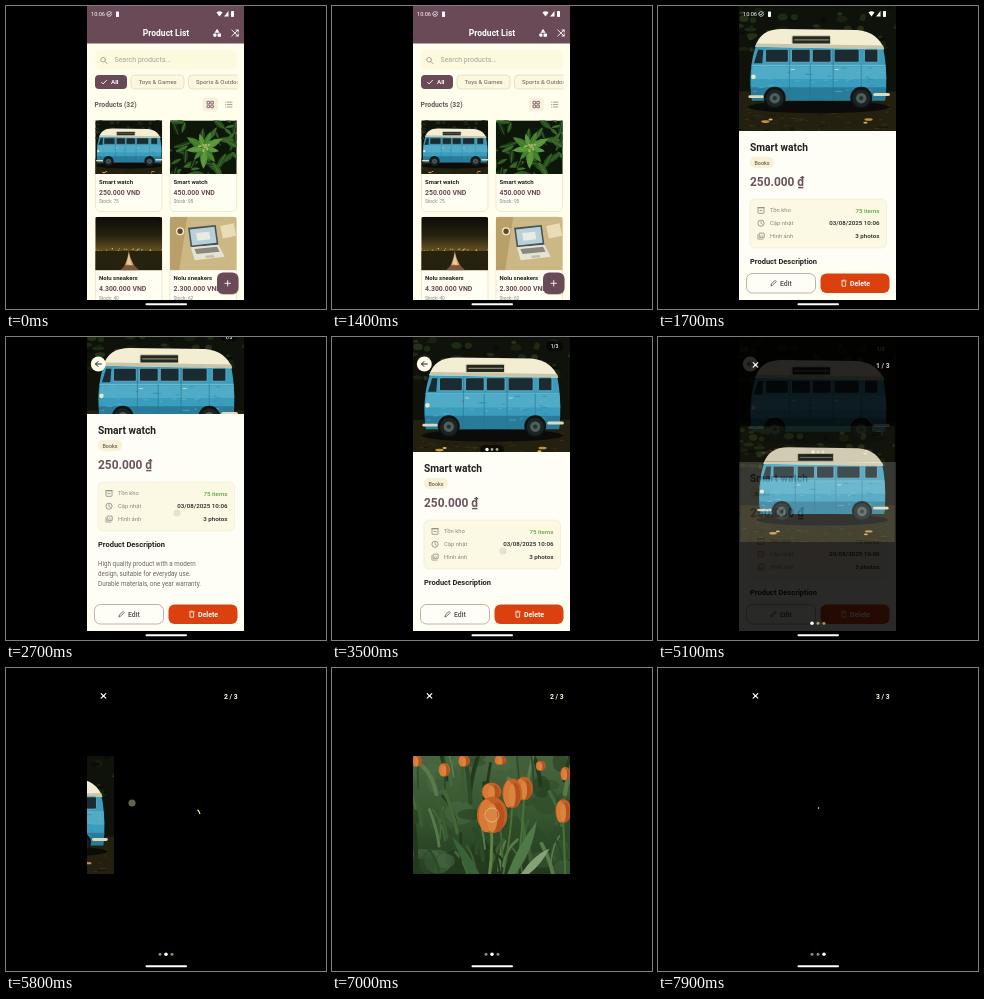
These frames come from a looping animation (320 px wide and 303 px high, 8 s). An HTML page:

```html
<!DOCTYPE html>
<html lang="en">
<head>
<meta charset="utf-8">
<title>Product app</title>
<style>
  html, body { margin: 0; width: 100%; height: 100%; overflow: hidden; background: #000; }
  body > svg { display: block; width: 100%; height: 100%; }
  text { font-family: Roboto, "Noto Sans", sans-serif; white-space: pre; }
</style>
</head>
<body>
<script>
const LOOP = 8000, STEP = 100;
const PLUM = '#6b4a58', CREAM = '#fffdec', INK = '#24201f', GREY = '#8d877c';

// Drawing helpers
const label = (x, y, str, size, fill = INK, weight = 400, anchor = 'start') =>
  `<text x="${x}" y="${y + size * .355}" font-size="${size}" fill="${fill}" font-weight="${weight}" text-anchor="${anchor}">${str}</text>`;
const box = (x, y, w, h, r, fill, extra = '') =>
  `<rect x="${x}" y="${y}" width="${w}" height="${h}" rx="${r}" fill="${fill}" ${extra}/>`;
const dot = (x, y, r, fill, extra = '') => `<circle cx="${x}" cy="${y}" r="${r}" fill="${fill}" ${extra}/>`;
const oval = (x, y, rx, ry, fill, extra = '') => `<ellipse cx="${x}" cy="${y}" rx="${rx}" ry="${ry}" fill="${fill}" ${extra}/>`;
const area = (d, fill, extra = '') => `<path d="${d}" fill="${fill}" ${extra}/>`;
const line = (d, color, width = .8) =>
  `<path d="${d}" fill="none" stroke="${color}" stroke-width="${width}" stroke-linecap="round" stroke-linejoin="round"/>`;
const at = (x, y, body) => `<g transform="translate(${x} ${y})">${body}</g>`;
const picture = (body, x, y, w, h, view = '0 0 160 120', id = '') =>
  `<svg id="${id}" x="${x}" y="${y}" width="${w}" height="${h}" viewBox="${view}" preserveAspectRatio="xMidYMid slice">${body}</svg>`;

function seeded(seed) {
  return () => (seed = (seed * 16807) % 2147483647) / 2147483647;
}
function scatter(count, seed, draw) {
  const rnd = seeded(seed);
  return Array.from({ length: count }, () => draw(rnd)).join('');
}
const pick = (list, rnd) => list[Math.floor(rnd() * list.length)];

// Pictures, all 160 x 120
const wheel = x => dot(x, 88, 10.5, '#0d1212') + dot(x, 88.5, 8.5, '#1d2323') + dot(x, 88.5, 5, '#4d5f5f') + dot(x, 88.5, 2, '#26302f');
const pane = (x, w) => box(x, 41.5, w, 12.5, 1.5, '#1a2b31', 'stroke="#6db3c6" stroke-width=".8"');
const van =
  box(-20, 0, 200, 120, 0, '#0f120b') +
  scatter(90, 41, r => oval(r() * 190 - 15, r() * 42, 2 + r() * 4, 1 + r() * 2.5, pick(['#1d2a14', '#182110', '#27311a', '#0a0d07'], r))) +
  box(-20, 82, 200, 38, 0, '#24200f') +
  scatter(70, 12, r => oval(r() * 190 - 15, 94 + r() * 26, 1 + r() * 3, .5, pick(['#332c16', '#16140b', '#3a3219'], r))) +
  oval(81, 97, 68, 6, '#0b0c09') +
  area('M21 38L143 40C146 54 147 74 145 89H17C14 72 16 52 21 38Z', '#3b9dbd') +
  area('M18 58H145.5L146 70H16Z', '#4fabc6') +
  area('M16 78H146L145 91H17Z', '#287b99') +
  scatter(40, 7, r => oval(20 + r() * 122, 58 + r() * 26, 1 + r() * 3, .6, pick(['#5db4cb', '#2f8cab', '#75b2b9'], r), 'opacity=".6"')) +
  area('M20 39C24 28 31 22 46 22L118 23C132 24 140 31 144 41.5Z', '#f2edd3') +
  area('M20 39L144 41.5L143 38L22 36Z', '#c9c5a8') +
  box(55.5, 28.5, 37, 8, 1, '#222720', 'stroke="#d8d3b5"') + line('M58 32.5H91', '#87866f', 1) +
  area('M19 55L23 42H28L27 55Z', '#1a2b31') +
  pane(30, 22) + pane(55, 18) + pane(75, 18) + pane(96, 24) + pane(125, 13) +
  line('M17 57H145', '#8acbd6', .7) + line('M53 42V90M95 42V90M73 57V90M122 57V80', '#267690', .6) +
  line('M55 61H58M97 61H100', '#d8dfce', .8) +
  wheel(39) + wheel(122) + line('M15 87H27', '#ddd9c0', 2.6) + line('M135 85H148', '#ddd9c0', 3) +
  dot(18.5, 68, 2.2, '#e8e5cc') +
  oval(30, 111, 4, 1.3, '#c59547') + oval(35, 109, 2, 1, '#e1b865') + oval(129, 109, 4, 1.2, '#c09045') + oval(126, 112, 2, .9, '#dfb15b');

const leaf = (x, y, angle, len, fill) =>
  `<g transform="translate(${x} ${y}) rotate(${angle})">${area(`M0 0Q${len * .4} ${-len * .35} ${len} 0Q${len * .4} ${len * .35} 0 0Z`, fill)}${line(`M2 0H${len * .9}`, '#8cab55', .7)}</g>`;
const plant =
  box(0, 0, 160, 120, 0, '#0c1609') +
  scatter(45, 91, r => leaf(r() * 160, r() * 120, r() * 360, 20 + r() * 24, pick(['#193a16', '#244d1c', '#102610', '#2f5b22'], r))) +
  Array.from({ length: 9 }, (_, i) => leaf(82, 62, i * 40 + 12, 34 + i % 3 * 6, i % 2 ? '#3f7c2a' : '#58943a')).join('') +
  scatter(12, 33, r => dot(70 + r() * 24, 52 + r() * 20, 2.4, '#a3b866'));

const night =
  box(0, 0, 160, 120, 0, 'url(#dusk)') + box(0, 76, 160, 44, 0, '#27210f') +
  scatter(26, 23, r => dot(r() * 160, 71 + r() * 5, .8 + r() * .7, pick(['#f5d469', '#cda950', '#fff2b5'], r))) +
  area('M67 120L77 92L80 76L84 92L97 120Z', '#c69765') + area('M75 106L80 83L87 108Z', '#e7c99c') +
  area('M60 120L72 108H92L104 120Z', '#7b573a');

const desk =
  box(0, 0, 160, 120, 0, '#cbb884') + area('M0 0H44L26 120H0Z', '#b9a069') +
  area('M46 24L108 18L114 62L52 68Z', '#47525a') + area('M50 28L105 22L110 58L55 64Z', '#b8d0d7') +
  area('M64 36L93 33L96 50L67 53Z', '#e9ece4') +
  area('M52 68L114 62L128 89L61 97Z', '#e7e3d4') + area('M60 72L111 67L117 78L65 83Z', '#88887f') +
  area('M84 87L103 85L106 90L86 92Z', '#c2beae') +
  oval(28, 32, 9, 9, '#f4edd4') + oval(28, 32, 6, 6, '#654527') + area('M118 20L148 14L154 42L124 48Z', '#e9ddb8');

const bloom = (x, y, rx, ry) =>
  oval(x, y, rx, ry, '#c75f24') + oval(x - rx * .38, y + ry * .05, rx * .5, ry * .9, '#d87a35') +
  oval(x + rx * .35, y + ry * .12, rx * .45, ry * .82, '#b5511e') + oval(x, y + ry * .15, rx * .36, ry * .78, '#d98542');
const tulips =
  box(0, 0, 160, 120, 0, 'url(#meadow)') +
  scatter(40, 19, r => oval(r() * 160, r() * 120, 5 + r() * 10, 4 + r() * 9, pick(['#1f3519', '#2c4727', '#3c5c38', '#4a6b45'], r), 'opacity=".5"')) +
  scatter(60, 57, r => {
    const x = r() * 170 - 5, y = 20 + r() * 110, bend = r() * 30 - 15;
    return line(`M${x} ${y}q${bend * .2} -18 ${bend} -${25 + r() * 20}`, pick(['#2b4a27', '#45683a', '#587a4c', '#223a1b', '#3b5c33'], r), 1.5 + r() * 3);
  }) +
  bloom(4, 5, 5, 6) + bloom(32, 14, 6, 7) + bloom(52, 5, 6, 6) + bloom(89, 4, 6, 5) + bloom(130, 10, 5, 5) + bloom(155, 18, 5, 7) +
  line('M80 76Q81 98 78 120', '#5f8247', 3) + line('M101 50Q100 80 92 120M113 42Q112 70 106 120M153 66L155 120', '#4a7138', 2) +
  area('M96 120Q106 92 126 66Q122 98 104 120Z', '#50794a') + area('M110 120Q122 101 139 94Q130 111 118 120Z', '#85a277') +
  area('M68 120Q55 94 40 82Q48 104 58 120Z', '#3a6237') +
  bloom(113, 33, 9, 12) + bloom(101, 38, 10, 15) + bloom(80, 36, 10, 9) + bloom(153, 56, 8, 12) + bloom(80.6, 60, 15.5, 18.5);

// Screens
const status =
  label(85, 8.2, '10:06', 5.6, '#fff') + line('M105.6 8a2.4 2.4 0 1 1 -1 -2M101.8 8l1.1 1.1 2.6 -3', '#fff', .7) +
  box(110, 5.5, 3, 5.5, .7, '#fff') +
  area('M210.5 6.5Q213.5 4 216.5 6.5L213.5 10.5Z', '#fff') + area('M218 10.5L222.5 5V10.5Z', '#fff') + box(225, 5, 3, 6, .7, '#fff');

function card(x, y, image, view, name, price, stock) {
  return box(x, y, 66.5, 91, 5, '#fffef3', 'stroke="#e2dcc2" stroke-width=".6"') +
    `<g clip-path="inset(0 round 5px 5px 0 0)">${picture(image, x, y, 66.5, 53.5, view)}</g>` +
    label(x + 3.5, y + 61, name, 6, INK, 700) + label(x + 3.5, y + 72, price, 6.9, PLUM, 700) + label(x + 3.5, y + 81, `Stock: ${stock}`, 4.8, GREY);
}
const chip = (x, w, str) =>
  box(x, 69, w, 14, 4, '#fbf8de', 'stroke="#d8d2b4" stroke-width=".6"') + label(x + 7.5, 76, str, 6, '#655d59');

const list =
  box(81, 0, 158, 294, 0, CREAM) + box(81, 0, 158, 37.5, 0, PLUM) + label(160, 26.5, 'Product List', 8.5, '#fff', 600, 'middle') +
  at(211, 27, area('M0 -4.2L2.5 -.3H-2.5Z', '#fff') + dot(-2.1, 2.1, 1.8, '#fff') + box(.6, .4, 3.4, 3.4, .2, '#fff')) +
  at(229, 27, line('M-3.2 -3L3 3M1 3H3.2V.9M-3.2 3L3 -3M1 -3H3.2V-.9', '#fff', .9)) +
  box(89, 44, 142, 19.5, 6, '#fcf9df') + line('M98.6 55.4a2.3 2.3 0 1 1 .1 -.1L101 57.6', GREY, .8) +
  label(108.5, 54, 'Search products...', 7, '#aaa392') +
  box(89, 69, 32, 14, 4, PLUM) + line('M95.5 76.3l1.6 1.6 3.4 -3.6', '#fff', .9) + label(105, 76.2, 'All', 6.2, '#fff', 600) +
  chip(125, 53, 'Toys &amp; Games') +
  `<g clip-path="url(#chips)">${chip(182.5, 68, 'Sports &amp; Outdoors')}</g>` +
  label(88.5, 99, 'Products (32)', 6.85, '#675a58', 600) +
  box(196.5, 91.5, 15.5, 14, 4, '#f6f1da') +
  [[201, 95.3], [204.8, 95.3], [201, 99.1], [204.8, 99.1]].map(([x, y]) => box(x, y, 2.6, 2.6, .2, 'none', `stroke="${PLUM}" stroke-width=".8"`)).join('') +
  line('M219.5 96.2h.1M219.5 98.6h.1M219.5 101h.1M221.2 96.2H226M221.2 98.6H226M221.2 101H226', GREY, .8) +
  card(89.5, 114.5, van, '8 6 144 108', 'Smart watch', '250.000 VND', 75) +
  card(164, 114.5, plant, '0 0 160 120', 'Smart watch', '450.000 VND', 95) +
  card(89.5, 211, night, '0 0 160 120', 'Nolu sneakers', '4.300.000 VND', 40) +
  card(164, 211, desk, '0 0 160 120', 'Nolu sneakers', '2.300.000 VND', 62) +
  box(211.5, 268, 21, 21, 6, '#0003') + box(211, 266.5, 21.5, 21.5, 6, PLUM) + line('M219 277.3H224.4M221.7 274.6V280', '#fff', .9);

const infoIcons = [
  box(-3, -2.4, 6, 5.4, .6, 'none', `stroke="${GREY}" stroke-width=".8"`) + line('M-3.3 -2.8H3.3M-1 .2H1', GREY),
  dot(0, 0, 3.1, 'none', `stroke="${GREY}" stroke-width=".8"`) + line('M0 -1.7V.2L1.4 1', GREY, .7),
  box(-1.8, -3, 5, 4.6, .5, 'none', `stroke="${GREY}" stroke-width=".8"`) + line('M-3.1 -1.4V3H1.9M-.7 .4L.6 -.8 2 .5', GREY, .7)
];
const infoRow = (i, name, value, color, weight) =>
  at(103, 204.3 + i * 12.9, infoIcons[i] + label(9, 0, name, 5.9, GREY) + label(118.5, 0, value, 6.2, color, weight, 'end'));

const content =
  label(92, 141, 'Smart watch', 10.2, INK, 700) +
  box(92, 151, 24, 11, 5, '#f7f2d5') + label(104, 156.6, 'Books', 5.4, '#6d625a', 500, 'middle') +
  label(92, 176, '250.000 ₫', 11.9, '#6a545d', 700) +
  box(92, 193, 136.5, 49, 5, '#fbf9e4', 'stroke="#eee8cc" stroke-width=".6"') +
  infoRow(0, 'Tồn kho', '75 items', '#62a63e', 500) +
  infoRow(1, 'Cập nhật', '03/08/2025 10:06', INK, 500) +
  infoRow(2, 'Hình ảnh', '3 photos', INK, 500) +
  label(92, 255.3, 'Product Description', 7.5, INK, 700) +
  ['High quality product with a modern', 'design, suitable for everyday use.', 'Durable materials, one year warranty.'].map((s, i) => label(92, 275 + i * 10, s, 6.3, '#6c655f')).join('');

const actions =
  box(81, 261.5, 158, 32.5, 0, '#fffef3') +
  box(88.5, 267.5, 69, 19.5, 6, '#fffef6', 'stroke="#a0918f" stroke-width=".7"') +
  line('M113 279.6l.4 -1.6 3.6 -3.6 1.2 1.2 -3.6 3.6Z', '#55484c', .8) + label(122, 277.5, 'Edit', 6.9, '#55484c', 500) +
  box(162.5, 267.5, 69, 19.5, 6, '#dc400f') +
  line('M183.4 275H188.2M184.8 274.2H186.8M184 276V280.2H187.6V276', '#fff', .8) + label(192, 277.5, 'Delete', 7, '#fff', 600);

const heroMarks =
  box(133, 7, 17, 10, 5, '#0008') + label(141.5, 12, '1/3', 5, '#fff', 500, 'middle') +
  box(67, 110.5, 24, 9, 4.5, '#0009') + dot(74, 115, 1.7, '#fff') + dot(79, 115, 1.4, '#aaa88e') + dot(84, 115, 1.4, '#aaa88e');

const viewer =
  box(80, 0, 160, 294, 0, '#000') +
  `<g id="pages">${picture(van, 81, 88, 157, 118, '-4 0 160 120')}
    <g id="second">${picture(tulips, 238, 88, 157, 118)}${dot(317, 147, 7, 'none', 'stroke="#f3d9a5" stroke-width=".8" opacity=".7"')}</g>
    <path id="spinner" fill="none" stroke="#f3efb8" stroke-width="1.3"/></g>` +
  line('M95.2 25.6L99.8 30.2M99.8 25.6L95.2 30.2', '#fff', 1.2) +
  '<text id="count" x="224.8" y="30.5" font-size="6.8" fill="#fffde0" font-weight="600" text-anchor="middle"></text>' +
  [154, 160, 166].map(x => dot(x, 286.3, 1.5, '#8f8f58', 'class="pager"')).join('');

document.body.innerHTML = `<svg viewBox="0 0 320 303" preserveAspectRatio="none">
  <defs>
    <clipPath id="phone"><rect x="81" width="157" height="294"/></clipPath>
    <clipPath id="chips"><rect x="182" y="60" width="49.5" height="30"/></clipPath>
    <linearGradient id="dusk" x2="0" y2="1"><stop stop-color="#0c0b08"/><stop offset=".35" stop-color="#27220f"/><stop offset=".64" stop-color="#655323"/></linearGradient>
    <linearGradient id="meadow" x2="0" y2="1"><stop stop-color="#486540"/><stop offset=".5" stop-color="#35562f"/><stop offset="1" stop-color="#22381c"/></linearGradient>
  </defs>
  <rect width="320" height="303"/>
  <g clip-path="url(#phone)">
    <g id="shop">
      <g>${list}</g>
      <g id="detail">${box(81, 0, 158, 294, 0, '#fffef6')}<g id="content">${content}</g>${actions}</g>
      <svg id="hero">${picture(van, 0, 0, 157, 125, '0 0 160 120', 'heroPic')}<g id="marks">${heroMarks}</g></svg>
      <g id="back">${dot(92.3, 27, 7.5, '#fffbe8')}${line('M95.3 27H89.6M92 24.5L89.5 27L92 29.5', '#222', 1)}</g>
      <g id="status">${status}</g>
    </g>
    <g id="viewer">${viewer}</g>
    <circle id="touch" r="3.6" fill="#a6a47c"/>
  </g>
  ${box(139.5, 297.3, 41.5, 1.9, .9, '#fff')}
</svg>`;

// Motion: tables of [time, value]
const OPEN = [[1400, 0], [1500, .4], [1600, .85], [1700, 1]];
const MARKS = [[1700, 0], [2000, 1]];
const SCROLL = [[2300, 0], [2500, 18], [2700, 48], [2900, 60], [3100, 60], [3300, 36], [3500, 10], [3700, 0]];
const VIEW = [[4700, 0], [4900, .5], [5200, 1]];
const SWIPE = [[5500, 0], [5600, 12], [5700, 65], [5800, 130], [5900, 150], [6000, 156], [6100, 157],
  [7000, 157], [7100, 169], [7200, 222], [7300, 287], [7400, 307], [7500, 313], [7600, 314]];

function track(table, t) {
  if (t <= table[0][0]) return table[0][1];
  for (let i = 1; i < table.length; i++) {
    const [t0, a] = table[i - 1], [t1, b] = table[i];
    if (t <= t1) return a + (b - a) * (t - t0) / (t1 - t0);
  }
  return table[table.length - 1][1];
}

const $ = id => document.getElementById(id);
const set = (id, attrs) => { for (const key in attrs) $(id).setAttribute(key, attrs[key]); };
const show = (id, on) => set(id, { display: on ? 'inline' : 'none' });
const pagers = document.querySelectorAll('.pager');

function arc(x, y, r, from, sweep) {
  const point = deg => `${x + r * Math.cos(deg * Math.PI / 180)} ${y + r * Math.sin(deg * Math.PI / 180)}`;
  return `M${point(from)}A${r} ${r} 0 ${sweep > 180 ? 1 : 0} 1 ${point(from + sweep)}`;
}

function drawDetail(t) {
  const open = track(OPEN, t), scroll = track(SCROLL, t), marks = track(MARKS, t);
  const mix = (a, b) => a + (b - a) * open;
  const width = mix(66.5, 157), height = mix(53.5, 125);
  set('detail', { opacity: open });
  set('content', { transform: `translate(0 ${-scroll})` });
  set('hero', { x: mix(89.5, 81), y: mix(114.5, 0), width, height: height - scroll });
  show('hero', t > 1400);
  set('heroPic', { width, height, y: -scroll / 4 });
  set('marks', { opacity: marks, transform: `translate(0 ${-scroll / 4})` });
  set('back', { opacity: marks });
  set('status', { opacity: 1 - marks });
}

function drawViewer(t) {
  const view = track(VIEW, t), offset = track(SWIPE, t), page = Math.round(offset / 157);
  const zoom = .9 + .1 * view;
  show('shop', view < 1);
  set('viewer', { opacity: view });
  set('pages', { transform: `translate(${160 - 160 * zoom - offset} ${147 - 147 * zoom}) scale(${zoom})` });
  show('second', t >= 6800);
  $('count').textContent = `${page + 1} / 3`;
  pagers.forEach((p, i) => {
    p.setAttribute('fill', i === page ? '#fff' : '#8f8f58');
    p.setAttribute('r', i === page ? 1.8 : 1.5);
  });

  const last = t >= 7100, age = t - (last ? 7100 : 5710);
  const sweep = 10 + 260 * Math.sin(Math.PI * age / 800) ** 2;
  set('spinner', { d: arc(last ? 474 : 317, 147, 7, age * .45 - 90, sweep) });
  show('spinner', last || (t >= 5710 && t < 6800));
}

function drawTouch(t) {
  const scrolling = t >= 2400 && t <= 3600;
  const swipe = [5600, 7100].find(start => t >= start && t <= start + 200);
  show('touch', scrolling || swipe);
  if (scrolling) set('touch', { cx: 171, cy: 224 - track(SCROLL, t), opacity: .25 });
  else if (swipe) set('touch', { cx: 214 - (t - swipe) * .44, cy: 135, opacity: .6 });
}

function frame(now) {
  const t = Math.floor(now % LOOP / STEP) * STEP;
  drawDetail(t);
  drawViewer(t);
  drawTouch(t);
}

const start = performance.now();
frame(0);
requestAnimationFrame(function tick() {
  frame(performance.now() - start);
  requestAnimationFrame(tick);
});
</script>
</body>
</html>
```
